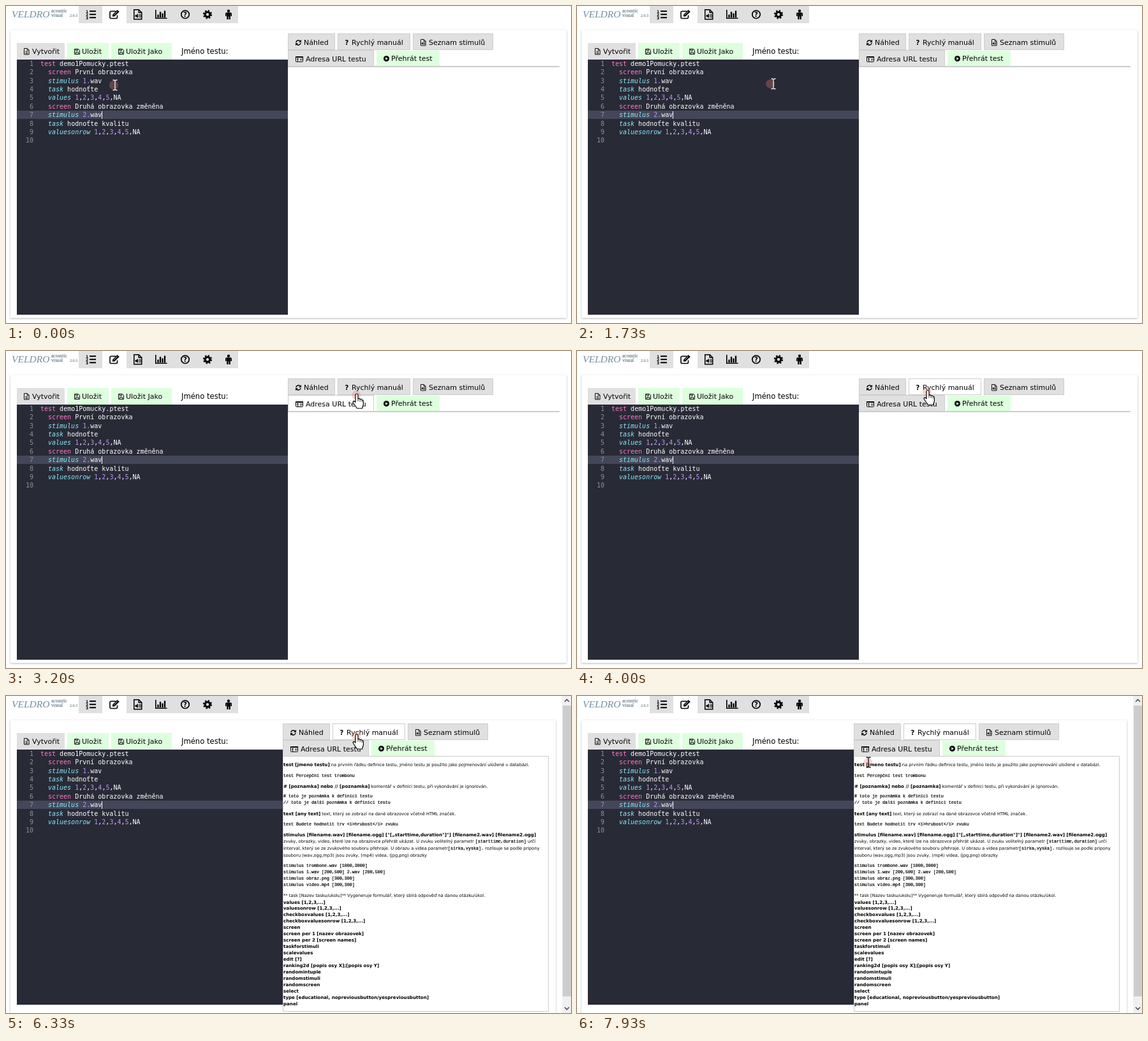
An HTML page that plays this animation: 886 by 497 pixels, repeating every 8000 ms.

```html
<!DOCTYPE html>
<html lang="cs">
<head>
<meta charset="utf-8">
<title>Editor testu</title>
<style>
  html, body { margin: 0; width: 100%; height: 100%; overflow: hidden; background: #fff; }
  svg { display: block; }
  text { white-space: pre; font: 11px "DejaVu Sans", sans-serif; }
  .logo { font: italic 15.5px "Liberation Serif", serif; fill: #7390a0; }
  .sub { font: 7.6px "Liberation Serif", serif; fill: #34505f; }
  .label { font-size: 11.6px; }
  .code { font: 10px "DejaVu Sans Mono", monospace; fill: #fff; }
  .gutter { fill: #909194; text-anchor: end; }
  .key { fill: #ff79c6; }
  .cmd { fill: #8be9fd; font-style: italic; }
  .num { fill: #bd93f9; }
  .doc { font-size: 6.7px; }
  .bold { font-size: 7.1px; font-weight: bold; }
  .mono { font: 6.67px "Liberation Mono", monospace; stroke: #000; stroke-width: .2; }
  .line { fill: none; stroke: #000; }
</style>
</head>
<body>
<svg id="stage" width="886" height="497" viewBox="0 0 886 497"></svg>
<script>
const GREY = '#e0e0e0', GREEN = '#ddffdd', BORDER = '#ccc';
const stage = document.getElementById('stage');

const escapeText = s => s.replace(/&/g, '&amp;').replace(/</g, '&lt;');
const rect = (x, y, w, h, fill, extra = '') =>
  `<rect x="${x}" y="${y}" width="${w}" height="${h}" fill="${fill}" ${extra}/>`;
const text = (x, y, content, cls = '') => `<text x="${x}" y="${y}" class="${cls}">${content}</text>`;
const path = (d, extra = 'class="line"') => `<path d="${d}" ${extra}/>`;
const at = (x, y, content, scale = 1) =>
  `<g transform="translate(${x} ${y}) scale(${scale})">${content}</g>`;
const tab = (x, y, w, id = '') =>
  rect(x + .5, y + .5, w - 1, 25, GREY, `stroke="${BORDER}" id="${id}"`);

const sheet = path('M.5.5H5.5L8.5 3.5V10.5H.5ZM5.5.5V3.5H8.5');
const icons = {
  doc: sheet + path('M2.5 5.5H6.5M2.5 7.2H6.5M2.5 8.9H6.5', 'class="line" stroke-width=".8"'),
  sound: sheet + path('M1.8 6H3L4.6 4.6V9.4L3 8H1.8Z', '') +
    path('M5.6 5.6Q6.6 7 5.6 8.4M6.6 4.8Q8.2 7 6.6 9.2', 'class="line" stroke-width=".7"'),
  save: path('M.5.5H6.5L8.5 2.5V8.5H.5ZM2.5 8V5.5H6.5V8M2.5 1V3H5.5V1'),
  refresh: path('M.8 4A3.8 3.8 0 0 1 7.5 2.2M8.2 5A3.8 3.8 0 0 1 1.5 6.8', 'class="line" stroke-width="1.5"') +
    path('M9 0V4H5ZM0 9V5H4Z', ''),
  card: rect(.5, .5, 11, 8, '#fff', 'stroke="#000" rx="1"') + rect(0, 0, 12, 2, '#000') +
    '<circle cx="3.5" cy="4.1" r="1.3"/>' + path('M1.6 7.3Q3.5 4.2 5.4 7.3Z', '') +
    path('M7 4H10.5M7 6H10.5'),
  play: '<circle cx="4.5" cy="4.5" r="4.5"/>' + path('M3.2 2.2L7 4.5L3.2 6.8Z', 'fill="#ddffdd"')
};

function header() {
  const digits = ['1', '2', '3'].map((d, i) =>
    `<text x="125" y="${10.5 + i * 5}" style="font-size:6px;font-weight:bold">${d}</text>` +
    rect(131, 7.2 + i * 5, 10, 2, '#000')).join('');
  return text(9, 18, 'VELDRO', 'logo') + text(71, 9.5, 'acoustic', 'sub') + text(71, 17, 'visual', 'sub') +
    `<text x="100" y="17" class="sub" style="font-size:6px">2.0.3</text>` +
    rect(114, 0, 250, 27, GREY) + rect(151, 0, 38, 27, '#fff') + digits +
    path('M172 8.2H165Q163 8.2 163 10.2V17.5Q163 19.5 165 19.5H172.5Q174.5 19.5 174.5 17.5V14.5', 'class="line" stroke-width="1.6"') +
    path('M167 16.5V13.5L174.5 6L177.8 9L170 16.5Z', '') +
    path('M168.8 14L174.5 8.4', 'stroke="#fff" stroke-width=".8"') +
    at(200, 5, icons.sound, 1.5) +
    path('M234.8 6V19.3H252.5', 'class="line" stroke-width="1.6"') +
    path('M238.5 18V13.5M242 18V9M245.5 18V11.5M249 18V7.5', 'class="line" stroke-width="2.3"') +
    '<circle cx="281" cy="13.3" r="6.2" class="line" stroke-width="1.7"/>' +
    `<text x="278.1" y="17" style="font-size:10px;font-weight:bold">?</text>` +
    '<circle cx="316" cy="13.3" r="3.8" class="line" stroke-width="3.2"/>' +
    '<circle cx="316" cy="13.3" r="6" class="line" stroke-width="2.2" stroke-dasharray="2.356"/>' +
    '<circle cx="349" cy="7.7" r="2.2"/>' +
    path('M346 10.3H352Q354 10.3 354 12V16H352.3V12.5H351.8V21H349.5V16.5H348.5V21H346.2V12.5H345.7V16H344V12Q344 10.3 346 10.3Z', '');
}

function editor() {
  const lines = ['test demo1Pomucky.ptest', 'screen První obrazovka', 'stimulus 1.wav', 'task hodnoťte',
    'values 1,2,3,4,5,NA', 'screen Druhá obrazovka změněna', 'stimulus 2.wav', 'task hodnoťte kvalitu',
    'valuesonrow 1,2,3,4,5,NA', ''];
  const rows = lines.map((line, i) => {
    const y = 94 + i * 13.36;
    const [, word, rest] = line.match(/^(\S*)(.*)$/);
    const cls = /^(test|screen)$/.test(word) ? 'key' : 'cmd';
    const numbers = rest.replace(/\b\d\.?/g, '<tspan class="num">$&</tspan>');
    return text(43, y, i + 1, 'code gutter') +
      text(i ? 66 : 54, y, `<tspan class="${cls}">${word}</tspan>${numbers}`, 'code');
  }).join('');
  return rect(17, 58, 75, 26, GREY) + rect(96, 58, 65, 26, GREEN) + rect(165, 58, 95, 26, GREEN) +
    at(28, 66, icons.doc, .95) + at(107, 67, icons.save) + at(176, 67, icons.save) +
    text(41, 75, 'Vytvořit') + text(119, 75, 'Uložit') + text(188, 75, 'Uložit Jako') +
    text(275, 75, 'Jméno testu:', 'label') +
    rect(17, 84, 425, 400, '#282a36', 'id="editorBack"') + rect(17, 164, 425, 13, '#44475a', 'id="activeLine"') +
    rows + rect(150, 165, 1, 12, '#f8f8f0');
}

const tabs = () =>
  tab(442, 43, 74) + tab(520, 43, 114, 'manualTab') + tab(638, 43, 126) +
  tab(442, 69, 135, 'addressTab') + rect(581, 70, 99, 24, GREEN) +
  at(454, 53, icons.refresh) + at(650, 52, icons.sound, .95) + at(454, 79, icons.card) + at(592, 78, icons.play) +
  `<text x="531.5" y="61" style="font-size:10px;font-weight:bold">?</text>` +
  text(467, 61, 'Náhled') + text(542, 61, 'Rychlý manuál') + text(663, 61, 'Seznam stimulů') +
  text(470, 87, 'Adresa URL testu') + text(604, 86, 'Přehrát test');

// ^…^ marks bold, `…` marks monospace
const rich = (y, source) => text(435, y, escapeText(source)
  .replace(/\^(.*?)\^/g, '<tspan class="bold">$1</tspan>')
  .replace(/`(.*?)`/g, '<tspan class="mono">$1</tspan>'), 'doc');

function manual() {
  const paragraphs = [
    [109.5, '^test [jmeno testu]^ na prvním řádku definice testu, jméno testu je použito jako pojmenování uložené v databázi.'],
    [126.5, '`test Percepční test trombonu`'],
    [143.5, '^# [poznamka] nebo // [poznamka]^ komentář v definici testu, při vykonávání je ignorován.'],
    [159, '`# toto je poznámka k definici testu`'],
    [169, '`// toto je další poznámka k definici testu`'],
    [186.5, '^text [any text]^ text, který se zobrazí na dané obrazovce včetně HTML značek.'],
    [202.5, '`text Budete hodnotit trv <i>hrubost</i> zvuku`'],
    [219.8, '^stimulus [filename.wav] [filename.ogg] ["[„starttime,duration"]"] [filename2.wav] [filename2.ogg]^'],
    [229.8, 'zvuky, obrazky, video, které lze na obrazovce přehrát ukázat. U zvuku volitelný parametr `[starttime,duration]` určí'],
    [241.2, 'interval, který se ze zvukového souboru přehraje. U obrazu a videa parametr`[sirka,vyska].` rozlisuje se podle pripony'],
    [251.5, 'souboru (wav,ogg,mp3) jsou zvuky, (mp4) videa, (jpg,png) obrazky'],
    [268, '`stimulus trombone.wav [1000,3000]`'],
    [278, '`stimulus 1.wav [200,500] 2.wav [200,500]`'],
    [288, '`stimulus obraz.png [300,300]`'],
    [298, '`stimulus video.mp4 [300,300]`'],
    [314.8, '** task [Nazev tasku/ukolu]** Vygeneruje formulář, který sbírá odpověď na danou otázku/úkol.']
  ];
  const commands = ['values [1,2,3,...]', 'valuesonrow [1,2,3,...]', 'checkboxvalues [1,2,3,...]',
    'checkboxvaluesonrow [1,2,3,...]', 'screen', 'screen per 1 [nazev obrazovek]', 'screen per 2 [screen names]',
    'taskforstimuli', 'scalevalues', 'edit [?]', 'ranking2d [popis osy X];[popis osy Y]', 'randomintuple',
    'randomstimuli', 'randomscreen', 'select', 'type [educational, nopreviousbutton/yespreviousbutton]', 'panel'];
  return rect(434.5, 94.5, 416, 400, '#fff', `stroke="${BORDER}"`) +
    paragraphs.map(p => rich(...p)).join('') +
    commands.map((c, i) => rich(325.5 + i * 9.97, `^${c}^`)).join('') +
    rect(872, 0, 14, 497, '#f0f0f0') + rect(873, 15, 13, 456, '#cdcdcd') +
    path('M876 9L879.5 5.5L883 9M876 488L879.5 491.5L883 488', 'fill="none" stroke="#505050" stroke-width="1.6"');
}

const pointers = () =>
  '<circle id="spot" r="7" fill="#e6786e" fill-opacity=".33"/><g id="pointer">' +
  path('M-3.5-8Q-1-8 0-7Q1-8 3.5-8M0-7V7M-3.5 8Q-1 8 0 7Q1 8 3.5 8', 'id="beam" fill="none" stroke-width="1.3"') +
  path('M0 0V16L3.7 12.5L6.3 18.5L8.7 17.5L6.1 11.6H11.3Z', 'id="arrow" fill="#fff" stroke="#000"') +
  `<g id="hand">${path('M-2 1.5Q0-1.5 2 1.5V8Q4.2 6.3 5.2 8.8Q7.3 7.3 8.2 9.8Q10.4 9.5 10.4 12V17L8.5 23H.5L-5 15Q-7 11.5-4.2 11.3L-2 13.2Z',
    'fill="#fff" stroke="#000" stroke-width="1.2" stroke-linejoin="round"')}${path('M2 8V12M5.2 9V12.5M8.2 10V13', 'class="line" stroke-width=".8"')}</g></g>` +
  `<g id="click">${rect(565.5, 53.5, 21, 29.5, '#555', 'rx="9"')}` +
  path('M565.5 67V62.5Q565.5 53.5 574.5 53.5H575.5V67Z', 'fill="#d9435a"') +
  path('M565.5 67.5H586.5M576 53.5V67', 'stroke="#fff" stroke-width="1.2"') +
  rect(574, 57, 4, 7, '#555', 'rx="2" stroke="#fff"') + '</g>';

stage.innerHTML =
  rect(7, 38, 872, 451, '#fff', 'id="card" style="filter:drop-shadow(0 1px 1.5px rgba(0,0,0,.28))"') +
  header() + editor() +
  rect(442, 94, 426, 2, BORDER, 'id="emptyPanel"') +
  `<g id="manual">${manual()}</g><g id="tabs">${tabs()}</g>` + pointers();

const el = id => document.getElementById(id);
const set = (id, name, value) => el(id).setAttribute(name, value);
const show = (id, visible) => { el(id).style.display = visible ? '' : 'none'; };

// pointer path: tick (1/15 s), x, y
const route = [[0, 171, 124], [15, 171, 124], [20, 192, 124], [23, 236, 123], [26, 308, 122], [28, 375, 120],
  [29, 405, 118], [31, 462, 112], [35, 512, 100], [38, 537, 93], [41, 556, 86], [45, 555, 76], [48, 550, 67],
  [52, 550, 66], [57, 550, 66], [61, 550, 60], [108, 550, 60], [111, 545, 74], [114, 520, 90],
  [117, 476, 111], [119, 457, 104], [120, 457, 104]];

function position(tick) {
  const next = Math.max(1, route.findIndex(k => k[0] >= tick));
  const a = route[next - 1], b = route[next];
  const u = Math.max(0, (tick - a[0]) / (b[0] - a[0]));
  return [a[1] + (b[1] - a[1]) * u, a[2] + (b[2] - a[2]) * u];
}

function render(time) {
  const tick = Math.min(119, Math.floor((time + 4) * 15 / 1000));
  const between = (from, to) => tick >= from && tick < to;
  const open = tick >= 95;

  show('manual', open);
  show('emptyPanel', !open);
  set('tabs', 'transform', `translate(${open ? -8 : 0} 0)`);
  set('card', 'width', open ? 855 : 872);
  set('card', 'height', open ? 470 : 451);
  set('editorBack', 'width', open ? 417 : 425);
  set('activeLine', 'width', open ? 417 : 425);
  set('addressTab', 'fill', between(42, 49) || between(112, 116) ? '#fff' : GREY);
  set('manualTab', 'fill', tick >= 49 ? '#fff' : GREY);
  show('click', between(83, 95));

  const [x, y] = position(tick);
  const onCode = x < 442, onTabs = !onCode && y < 96;
  const beam = onCode || (!onTabs && open);
  show('beam', beam);
  show('hand', onTabs);
  show('arrow', !beam && !onTabs);
  set('beam', 'stroke', onCode ? '#eee' : '#111');
  set('pointer', 'transform', `translate(${x} ${y})`);
  const [lagX, lagY] = position(Math.max(0, tick - .12));
  set('spot', 'cx', lagX - (onTabs ? 1 : 2));
  set('spot', 'cy', lagY + (onTabs ? 2 : 0));
}

function loop() {
  render(performance.now() % 8000);
  requestAnimationFrame(loop);
}
loop();
</script>
</body>
</html>
```
